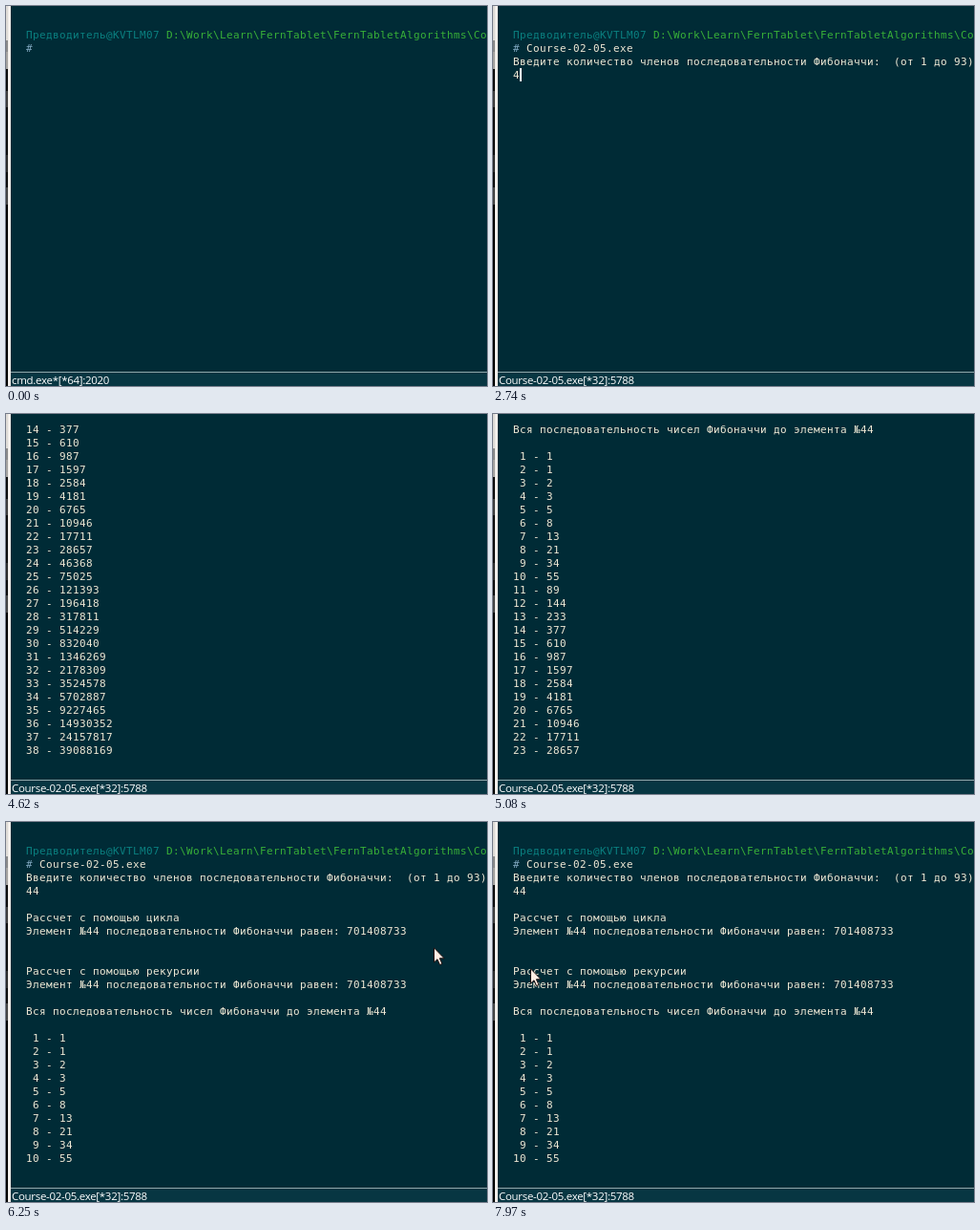
An HTML page for the animation above (8 s loop, 504 by 398 pixels).

```html
<!DOCTYPE html>
<html lang="ru">
<head>
<meta charset="utf-8">
<title>Терминал</title>
<style>
html, body { margin: 0; width: 100%; height: 100%; overflow: hidden; background: #002b36; }
#stage { position: relative; width: 504px; height: 398px; overflow: hidden; background: #002b36; }
#stage * { position: absolute; }

/* sliver of the desktop and window frame on the left */
#edge {
  left: 0; top: 0; width: 2px; height: 398px;
  background: linear-gradient(#dedbd6 0 36px, #8a8a8a 36px 48px, #a5a3a0 48px 66px,
    #0c0c0c 66px 89px, #3d3d3d 89px 106px, #0c0c0c 106px 156px,
    #2c2c2c 156px 174px, #0c0c0c 174px 190px, #444 190px 208px, #000 208px);
}
#frame { left: 2px; top: 0; width: 3px; height: 398px; background: #f1eeea; }

#term { left: 21px; top: 9px; width: 483px; height: 350px; overflow: hidden; }
#log {
  left: 0; top: 0; width: 483px; height: 868px;
  font: 11px/15px "DejaVu Sans Mono", monospace;
  letter-spacing: calc(7px - 1ch); /* 7px character grid */
  color: #eee8d5; animation: scroll 8s step-end infinite;
}
#log span { white-space: pre; }
#log .user { color: #0a8080; }
#log .path { color: #38b038; }
#log .hash { color: #7fa8c0; }
#caret { width: 2px; height: 14px; background: #fff; animation: caret 8s step-end infinite; }

#bar { left: 5px; top: 383px; width: 499px; height: 15px; background: #073642; }
#bar::before { content: ""; position: absolute; left: 0; top: 0; width: 100%; height: 1px; background: #93a6ab; }
#bar span {
  left: 1px; top: 1px; white-space: pre; color: #fff;
  font: 11.5px/15px "Open Sans", sans-serif; letter-spacing: -.3px;
}
#pointer { left: -1px; top: -1px; animation: move 8s step-end infinite; }

.cmd { animation: cmd 8s step-end infinite; }
.ask { animation: ask 8s step-end infinite; }
.key1 { animation: key1 8s step-end infinite; }
.key2 { animation: key2 8s step-end infinite; }
.out { animation: out 8s step-end infinite; }
.shell { animation: shell 8s step-end infinite; }
.app { animation: app 8s step-end infinite; }

@keyframes cmd { 0% { opacity: 0 } 5.75%, to { opacity: 1 } }
@keyframes ask { 0% { opacity: 0 } 14.5%, to { opacity: 1 } }
@keyframes key1 { 0% { opacity: 0 } 34.25%, to { opacity: 1 } }
@keyframes key2 { 0% { opacity: 0 } 36.5%, to { opacity: 1 } }
@keyframes out { 0% { opacity: 0 } 39.25%, to { opacity: 1 } }
@keyframes shell { 0% { opacity: 1 } 15.75%, to { opacity: 0 } }
@keyframes app { 0% { opacity: 0 } 15.75%, to { opacity: 1 } }

/* output jumps to the end, then the wheel goes back three rows a notch */
@keyframes scroll {
  0% { transform: translateY(0) }
  39.25% { transform: translateY(-518px) }
  55.5% { transform: translateY(-476px) }
  56.625% { transform: translateY(-434px) }
  57.75% { transform: translateY(-392px) }
  58.875% { transform: translateY(-350px) }
  59.625% { transform: translateY(-308px) }
  60.375% { transform: translateY(-266px) }
  61.25% { transform: translateY(-224px) }
  63.5% { transform: translateY(-182px) }
  67% { transform: translateY(-140px) }
  67.5% { transform: translateY(-98px) }
  68% { transform: translateY(-56px) }
  68.75% { transform: translateY(-14px) }
  69.875%, to { transform: translateY(0) }
}
@keyframes caret {
  0% { left: 126px; top: 28px; opacity: 0 }
  6.125% { left: 126px; top: 28px; opacity: 1 }
  13.125% { left: 0; top: 56px; opacity: 0 }
  14.5% { left: 0; top: 56px; opacity: 1 }
  21.125% { left: 0; top: 56px; opacity: 0 }
  27.625% { left: 0; top: 56px; opacity: 1 }
  34.25% { left: 7px; top: 56px; opacity: 1 }
  36.5% { left: 14px; top: 56px; opacity: 1 }
  39.25% { left: 0; top: 854px; opacity: 0 }
  39.5% { left: 0; top: 854px; opacity: 1 }
  46.125% { left: 0; top: 854px; opacity: 0 }
  53.125%, to { left: 0; top: 854px; opacity: 1 }
}
@keyframes move {
  0% { transform: translate(520px, 132px) }
  76.5% { transform: translate(497px, 131px); animation-timing-function: steps(4) }
  78.125% { transform: translate(449px, 132px) }
  78.875% { transform: translate(434px, 131px); animation-timing-function: steps(10) }
  82.5% { transform: translate(264px, 128px); animation-timing-function: steps(10) }
  86.25% { transform: translate(95px, 129px); animation-timing-function: steps(6) }
  88.5% { transform: translate(14px, 131px); animation-timing-function: steps(4) }
  90% { transform: translate(1px, 128px); animation-timing-function: steps(17) }
  96.5% { transform: translate(177px, 103px) }
  97.625% { transform: translate(158px, 109px); animation-timing-function: steps(5) }
  99.25% { transform: translate(37px, 153px) }
  99.625%, to { transform: translate(40px, 154px) }
}
</style>
</head>
<body>
<div id="stage">
  <div id="edge"></div>
  <div id="frame"></div>
  <div id="term"><div id="log"><div id="caret"></div></div></div>
  <div id="bar">
    <span class="shell">cmd.exe*[*64]:2020</span>
    <span class="app">Course-02-05.exe[*32]:5788</span>
  </div>
  <svg id="pointer" width="13" height="20" viewBox="0 0 13 20">
    <path d="M.5 .8V16L4 12.8 6.6 18.6 9 17.5 6.4 11.8H11.2Z" fill="#ffeee4" stroke="#1c1010"/>
  </svg>
</div>
<script>
const log = document.getElementById('log');
const COUNT = 44;

function put(row, col, text, cls) {
  const span = document.createElement('span');
  span.className = cls;
  span.textContent = text;
  span.style.left = col * 7 + 'px';
  span.style.top = row * 14 + 'px';
  log.append(span);
}

const fib = [1, 1];
while (fib.length < COUNT) fib.push(fib.at(-1) + fib.at(-2));
const result = `Элемент №${COUNT} последовательности Фибоначчи равен: ${fib.at(-1)}`;

put(1, 0, 'Предводитель@KVTLM07', 'user');
put(1, 21, 'D:\\Work\\Learn\\FernTablet\\FernTabletAlgorithms\\Course', 'path');
put(2, 0, '#', 'hash');
put(2, 2, 'Course-02-05.exe', 'cmd');
put(3, 0, 'Введите количество членов последовательности Фибоначчи:  (от 1 до 93)', 'ask');
put(4, 0, '4', 'key1');
put(4, 1, '4', 'key2');
put(6, 0, 'Рассчет с помощью цикла', 'out');
put(7, 0, result, 'out');
put(10, 0, 'Рассчет с помощью рекурсии', 'out');
put(11, 0, result, 'out');
put(13, 0, `Вся последовательность чисел Фибоначчи до элемента №${COUNT}`, 'out');
fib.forEach((value, i) => put(15 + i, 0, `${String(i + 1).padStart(2)} - ${value}`, 'out'));
put(60, 0, 'Нажмите любую клавишу.', 'out');
</script>
</body>
</html>
```
